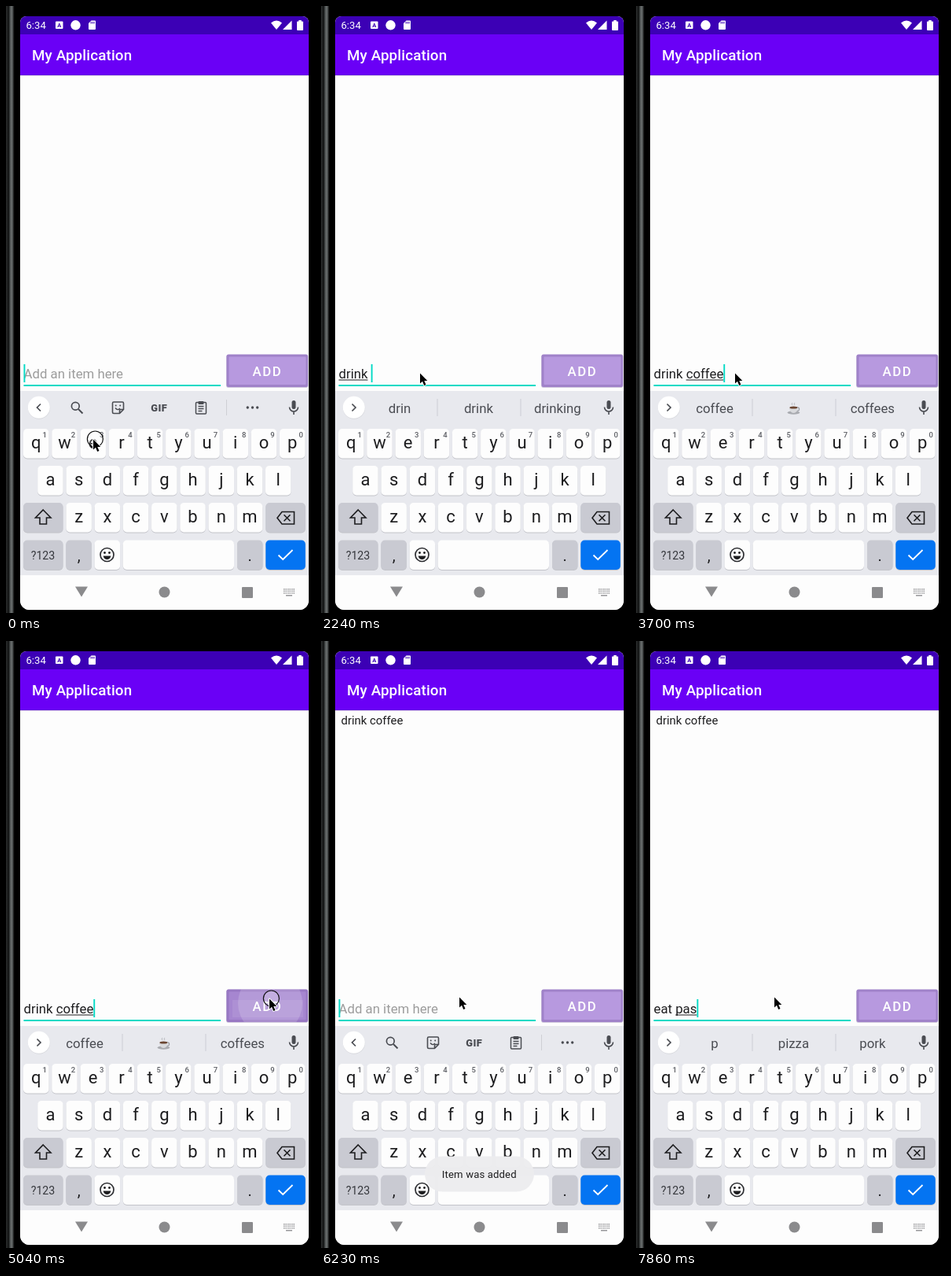
Animation, 393 px wide and 771 px high, one loop 8000 ms. Source, as an HTML page with a canvas:

```html
<!DOCTYPE html>
<html lang="en">
<head>
<meta charset="utf-8">
<title>Add an item</title>
<style>
html, body { margin: 0; width: 100%; height: 100%; overflow: hidden; background: #000; }
canvas { display: block; width: 393px; height: 771px; }
</style>
</head>
<body>
<canvas id="stage"></canvas>
<script>
const W = 393, H = 771, LOOP = 8000;
const canvas = document.getElementById('stage');
const dpr = window.devicePixelRatio || 1;
canvas.width = W * dpr;
canvas.height = H * dpr;
const c = canvas.getContext('2d');
c.scale(dpr, dpr);

const INK = '#1d1d1f', ICON = '#4a4c52', TEAL = '#03dac5';

// time, field text ("_" starts the word being composed), suggestions
const typing = [
  [0, ''],
  [900, 'd'],
  [1190, '_d', "d do didn't"],
  [1640, '_dr', "d do didn't"],
  [1790, '_dri', 'dr drink drive'],
  [1940, '_drin', 'dr drink drive'],
  [2240, '_drink ', 'drin drink drinking'],
  [2380, 'drink ', 'drink drinks drinking'],
  [2530, 'drink c', 'water coffee and'],
  [2680, 'drink _co', 'water coffee and'],
  [2820, 'drink _cof', 'co coffee cold'],
  [2970, 'drink _coff', 'co coffee cold'],
  [3110, 'drink _coffe', 'coff coffee coffees'],
  [3260, 'drink _coffe', 'coffe coffee coffees'],
  [3410, 'drink _coffee', 'coffe coffee coffees'],
  [3560, 'drink _coffee', 'coffee coffee coffees'],
  [3700, 'drink _coffee', 'coffee CUP coffees'],
  [5340, ''],
  [6670, 'e'],
  [6820, 'ea'],
  [7120, '_eat', 'ea eat east'],
  [7270, '_eat ', 'ea eat east'],
  [7410, 'eat ', 'and the it'],
  [7560, 'eat p', 'and the it'],
  [7710, 'eat _pa', 'p pizza pork'],
  [7860, 'eat _pas', 'p pizza pork']
];
// time, tip x, tip y, pressed
const pointer = [
  [0, 111, 550, 1], [150, 126, 466], [4750, 188, 468], [4890, 318, 457],
  [5040, 335, 454, 1], [5190, 335, 454], [5490, 320, 455], [5640, 269, 457],
  [5780, 238, 456], [5930, 205, 454], [6080, 186, 453], [6230, 176, 452]
];
const caret = [[0, 1], [4150, 0], [4600, 1], [5780, 0], [6230, 1]];
const toast = [[0, 0], [5490, .5], [5640, 1], [7410, .6], [7560, .2], [7710, 0]];
// time, radius, opacity
const ripple = [[0, 0, 0], [5040, 41, .16], [5190, 62, .14], [5340, 75, .07], [5490, 0, 0]];

const at = (rows, t) => rows.filter(r => r[0] <= t).pop();

function rect(x, y, w, h, color, r = 0) {
  c.fillStyle = color;
  c.beginPath();
  c.roundRect(x, y, w, h, r);
  c.fill();
}
function disc(x, y, r, color) {
  c.fillStyle = color;
  c.beginPath();
  c.arc(x, y, r, 0, 7);
  c.fill();
}
function fill(d, color) {
  c.fillStyle = color;
  c.fill(new Path2D(d));
}
function line(d, color, w = 1.7) {
  c.strokeStyle = color;
  c.lineWidth = w;
  c.stroke(new Path2D(d));
}
function text(s, x, y, size, color, align = 'left', weight = 400, gap = 0) {
  c.font = `${weight} ${size}px Roboto, sans-serif`;
  c.letterSpacing = gap + 'px';
  c.textAlign = align;
  c.fillStyle = color;
  c.fillText(s, x, y);
  const w = c.measureText(s).width;
  c.letterSpacing = '0px';
  return w;
}

function frame() {
  rect(0, 0, W, H, '#000');
  const g = c.createLinearGradient(0, 0, 11, 0);
  [[0, '#272929'], [.2, '#202222'], [.28, '#070707'], [.4, '#343838'],
   [.62, '#6d7272'], [.8, '#464a4a'], [.9, '#111'], [1, '#000']].forEach(s => g.addColorStop(...s));
  rect(0, 0, 11, H, g);
}

function header() {
  rect(18, 13, 367, 23, '#3c00b5');
  rect(18, 36, 367, 52, '#6a00f6');
  rect(18, 87.5, 367, 1, 'rgba(70,40,120,.35)');
  text('6:34', 25.5, 29, 13.1, '#fff');
  rect(63, 19.5, 9.5, 9.5, '#fff', 1);
  text('A', 67.8, 27.2, 7.5, '#3c00b5', 'center', 700);
  disc(88.5, 24.3, 6.2, '#fff');
  fill('M108.5 18.5H113q1 0 1 1V29q0 1-1 1h-7q-1 0-1-1V22z', '#fff');
  [108, 110, 112].forEach(x => rect(x - .4, 20, 1, 2.6, '#3c00b5'));
  fill('M337 21.4Q344 15.800 351 21.4L344 30z', '#fff');
  fill('M363.500 18.500V30H352z', '#fff');
  rect(370, 19.500, 8, 11.500, '#fff', 1);
  rect(372.300, 18, 3.400, 2, '#fff');
  text('My Application', 33, 69, 18.8, '#fff', 'left', 500, .14);
}

function button(t) {
  const [, r, a] = at(ripple, t);
  rect(280, 443, 104.5, 42, 'rgba(90,60,130,.25)', 3);
  rect(280.5, 442.5, 103.5, 41.5, '#a082c9', 2.5);
  rect(283.5, 445.5, 98, 35.5, '#b799df', 1);
  if (a) {
    c.save();
    c.beginPath();
    c.roundRect(280.5, 442.5, 103.5, 41.5, 2.5);
    c.clip();
    rect(280, 442, 105, 43, 'rgba(140,105,185,.4)');
    rect(288, 456, 90, 22, 'rgba(255,255,255,.08)');
    disc(336, 460, r, `rgba(255,255,255,${a})`);
    c.restore();
  }
  text('ADD', 313.6, 470, 16.8, '#fff', 'left', 500, 1.5);
}

function field(t) {
  const raw = at(typing, t)[1], s = raw.replace('_', '');
  const w = s ? text(s, 22.5, 473, 16.8, INK) : 0;
  if (!s) text('Add an item here', 22.5, 473, 16.8, '#9c9c9c');
  if (raw.includes('_')) {
    const [head, word] = raw.split('_');
    const x = 22.5 + c.measureText(head).width;
    rect(x, 474.5, c.measureText(word.trim()).width, 1, INK);
  }
  rect(22.5, 481, 250.500, 2, TEAL);
  if (at(caret, t)[1]) rect(22.5 + w, 455, 1.9, 23, TEAL);
}

function mic() {
  rect(363.500, 501, 5, 11, ICON, 2.500);
  line('M360.500 509.500a5.500 5.500 0 0 0 11 0M366 515v4', ICON, 1.600);
}

function toolbar() {
  line('M44 505.500L39.500 510L44 514.500', ICON);
  c.beginPath();
  c.arc(88.300, 508.300, 4.900, 0, 7);
  c.stroke();
  line('M92 512L97.500 517.500', ICON, 2);
  line('M137 503h11q1.500 0 1.500 1.500v8l-5 5H137q-1.500 0-1.500-1.500v-11.500q0-1.500 1.500-1.500M149.500 512.500h-3.500q-1.500 0-1.500 1.500v3.500', ICON, 1.600);
  line('M139 510.500q3 4 6 .500', ICON, 1.400);
  disc(139.700, 507.500, 1, ICON);
  disc(145.200, 507.500, 1, ICON);
  text('GIF', 194.800, 514.500, 12.800, ICON, 'center', 900, .5);
  line('M242.500 503.500h11q1 0 1 1V517q0 1-1 1h-11q-1 0-1-1v-12.500q0-1 1-1M244.500 508.500h7M244.500 511.500h7M244.500 514.500h5', ICON, 1.500);
  rect(244.500, 502, 7, 4, ICON, 1);
  rect(280, 500, 1, 20, '#cfd0d5');
  [307.300, 313.500, 319.700].forEach(x => disc(x, 510, 1.700, ICON));
}

function cup(x, y) {
  c.strokeStyle = '#9a9da3';
  c.lineWidth = 1.2;
  c.beginPath();
  c.arc(x + 5, y, 2.2, 0, 7);
  c.stroke();
  c.fillStyle = '#a9abb0';
  c.beginPath();
  c.ellipse(x, y + 4.5, 8, 2.2, 0, 0, 7);
  c.fill();
  c.fillStyle = '#d9dadd';
  c.beginPath();
  c.ellipse(x, y - 2, 5.5, 7, 0, 0, Math.PI);
  c.fill();
  c.fillStyle = '#6b4632';
  c.beginPath();
  c.ellipse(x, y - 2, 5, 1.6, 0, 0, 7);
  c.fill();
  line(`M${x - 1.5} ${y - 5}q-1.500-1.500 0-3M${x + 1.500} ${y - 5}q-1.500-1.500 0-3`, '#b5b7bc', 1);
}

function strip(t) {
  const words = at(typing, t)[2];
  disc(42, 510.5, 14.2, 'rgba(0,0,0,.07)');
  disc(41.800, 509.800, 14, '#fff');
  mic();
  if (!words) return toolbar();
  line('M39.500 505.500L44 510L39.500 514.500', ICON);
  [147.500, 253.500].forEach(x => rect(x, 499, 1, 22, '#cccdd3'));
  words.split(' ').forEach((s, i) => {
    const x = 100 + i * 100.4;
    if (s === 'CUP') cup(x, 512);
    else text(s, x, 516.500, 16.800, ICON, 'center');
  });
}

function key(x, y, w, color = '#fdfdfd') {
  rect(x, y + 1, w, 37.500, '#c3c4ca', 5);
  rect(x, y, w, 37.500, color, 5);
}
function keyRow(letters, x, y, digits) {
  [...letters].forEach((s, i) => {
    const kx = x + i * 36.220;
    key(kx, y, 32.500);
    text(s, kx + 16.250, y + 25, 22, INK, 'center');
    if (digits) text(digits[i], kx + 27.200, y + 10.500, 9.500, '#5b5d63', 'center', 500);
  });
}

function keyboard() {
  const dark = '#c9cad2';
  keyRow('qwertyuiop', 22, 537, '1234567890');
  keyRow('asdfghjkl', 40.200, 584);
  keyRow('zxcvbnm', 76.400, 631);
  key(22, 631, 50.500, dark);
  key(330.300, 631, 50.500, dark);
  line('M47.200 640L57 650H51.500V658H43V650H37.500z', INK, 1.600);
  line('M351 642.500H366.500V658H351L345 650.250zM353.500 646.200L361.500 654.200M361.500 646.200L353.500 654.200', INK, 1.600);
  key(22, 678.500, 50.500, dark);
  key(76.400, 678.500, 32.500, dark);
  key(112.600, 678.500, 32.500);
  key(148.800, 678.500, 141.200);
  key(294, 678.500, 32.500, dark);
  key(330.300, 678.500, 50.500, '#0474f2');
  text('?123', 47, 702.500, 14.200, '#35373c', 'center');
  text(',', 92.700, 705, 20, INK, 'center');
  text('.', 310.200, 705, 20, INK, 'center');
  c.lineWidth = 1.700;
  c.strokeStyle = '#2d2e32';
  c.beginPath();
  c.arc(128.500, 697, 8.500, 0, 7);
  c.stroke();
  disc(125.500, 694.500, 1.400, INK);
  disc(131.500, 694.500, 1.400, INK);
  fill('M123.500 698.500h10q-1.500 4.500-5 4.500t-5-4.500', INK);
  line('M346.500 697.500L352.200 703L364.500 691', '#fff', 1.800);
}

function navBar() {
  const grey = '#8b8b8d';
  rect(18, 723, 367, 44, '#fdfdfd');
  fill('M88 737.500H104L96 750.500z', grey);
  disc(201.500, 744.500, 7, grey);
  rect(300, 738, 14, 14, grey, 1);
  for (let x = 353; x < 367; x += 2.500)
    for (const y of [740, 742.500, 745]) rect(x, y, 1.500, 1.500, '#97979a');
  rect(356, 748, 8, 1.500, '#97979a');
}

function showToast(t) {
  c.globalAlpha = at(toast, t)[1];
  rect(132, 654.500, 139, 45, 'rgba(237,237,239,.96)', 22.500);
  text('Item was added', 201.300, 682, 13.100, INK, 'center', 400, .16);
  c.globalAlpha = 1;
}

function showPointer(t) {
  const [, x, y, down] = at(pointer, t);
  if (down) {
    disc(x + 2.400, y, 10, 'rgba(255,255,255,.2)');
    c.strokeStyle = '#111';
    c.lineWidth = 1.200;
    c.stroke();
  }
  c.save();
  c.translate(x, y);
  const arrow = 'M0 .500V13.500L3 10.700L5.200 16L7.500 15L5.300 9.900H9.300z';
  c.lineJoin = 'round';
  line(arrow, '#fff', 1.800);
  fill(arrow, '#000');
  c.restore();
}

function draw(t) {
  frame();
  c.save();
  c.beginPath();
  c.roundRect(18, 13, 367, 754, [8, 8, 12, 12]);
  c.clip();
  rect(18, 13, 367, 754, '#fdfdfd');
  header();
  if (t >= 5340) text('drink coffee', 25.500, 106, 14.900, INK);
  field(t);
  button(t);
  rect(18, 489, 367, 234, '#e8e9ee');
  strip(t);
  keyboard();
  navBar();
  showToast(t);
  c.restore();
  showPointer(t);
}

const start = performance.now();
function tick() {
  draw((performance.now() - start) % LOOP);
  requestAnimationFrame(tick);
}
tick();
</script>
</body>
</html>
```
